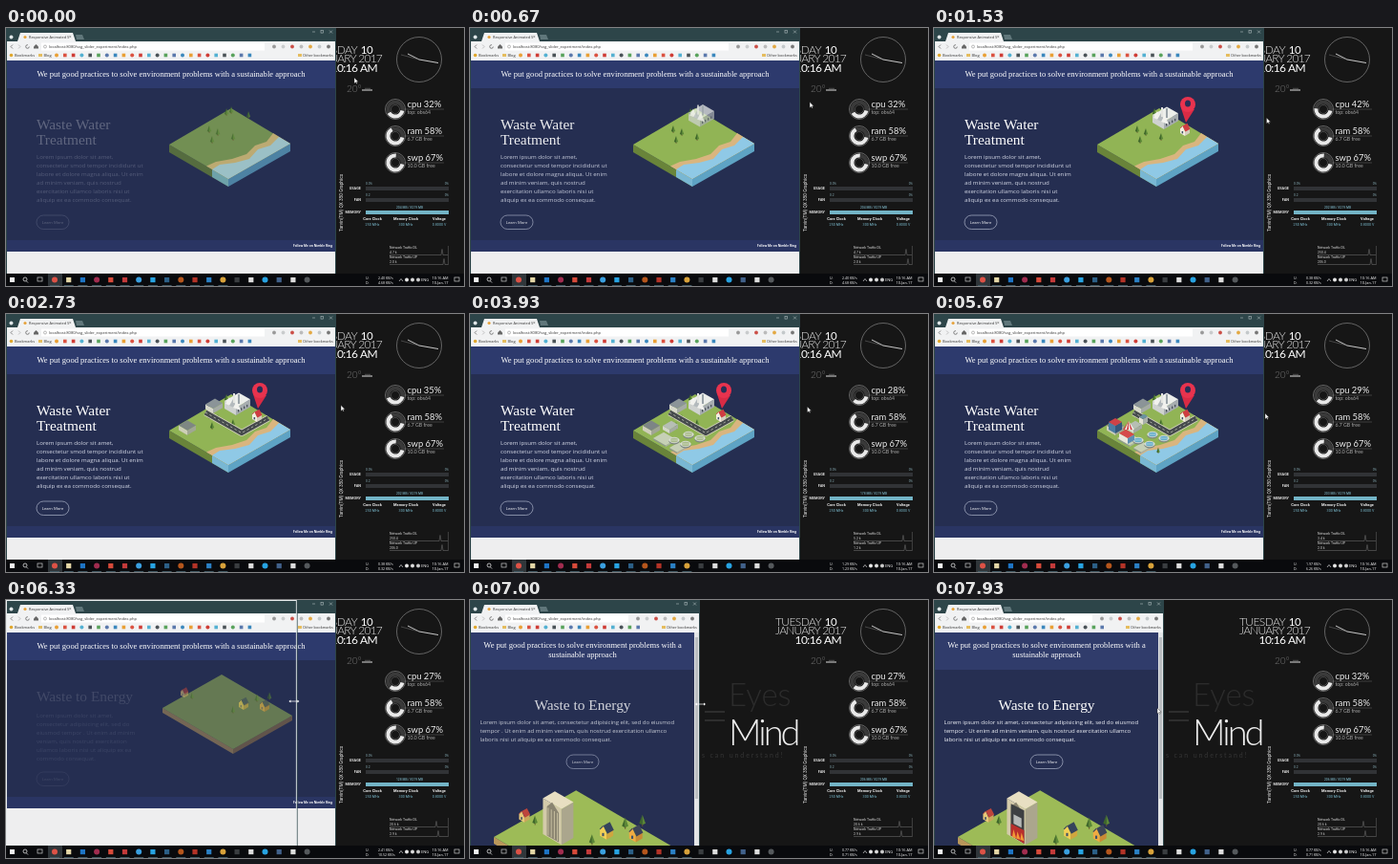
An HTML page with a canvas for the animation above (8 s loop, 480 by 270 pixels).

```html
<!DOCTYPE html>
<html lang="en">
<head>
<meta charset="utf-8">
<title>Responsive slider on a desktop</title>
<style>
html, body { margin: 0; width: 100%; height: 100%; overflow: hidden; background: #161616; }
canvas { display: block; width: 480px; height: 270px; }
</style>
</head>
<body>
<canvas id="stage"></canvas>
<script>
const LOOP = 8000, FULL = 346;
const SERIF = '"Liberation Serif", serif', SANS = '"Open Sans", sans-serif';
const LATO = 'Lato, sans-serif', ROBOTO = 'Roboto, sans-serif';
const canvas = document.getElementById('stage');
const ratio = window.devicePixelRatio || 1;
canvas.width = 480 * ratio;
canvas.height = 270 * ratio;
const c = canvas.getContext('2d');

// Time helpers
const clamp = v => Math.max(0, Math.min(1, v));
const ramp = (t, from, to) => { const p = clamp((t - from) / (to - from)); return p * p * (3 - 2 * p); };
const held = (steps, t) => steps.filter(s => s[0] <= t).pop()[1];
function track(steps, t) {
  const i = steps.findIndex(s => s[0] > t);
  if (i < 0) return steps[steps.length - 1].slice(1);
  if (i === 0) return steps[0].slice(1);
  const a = steps[i - 1], b = steps[i], p = (t - a[0]) / (b[0] - a[0]);
  return a.slice(1).map((v, k) => v + (b[k + 1] - v) * p);
}

// Drawing helpers
function rect(x, y, w, h, color) { c.fillStyle = color; c.fillRect(x, y, w, h); }
function text(s, x, y, size, color = '#fff', font = SANS, align = 'left', weight = 400, spacing = 0) {
  c.font = `${weight} ${size}px ${font}`;
  c.letterSpacing = `${spacing}px`;
  c.textAlign = align;
  c.fillStyle = color;
  c.fillText(s, x, y);
}
function trace(points) {
  c.beginPath();
  for (let i = 0; i < points.length; i += 2) c.lineTo(points[i], points[i + 1]);
}
function poly(color, ...points) { trace(points); c.closePath(); c.fillStyle = color; c.fill(); }
function line(color, width, ...points) { trace(points); c.strokeStyle = color; c.lineWidth = width; c.stroke(); }
function frameBox(x, y, w, h, color, width) { c.strokeStyle = color; c.lineWidth = width; c.strokeRect(x, y, w, h); }
function oval(x, y, rx, ry, color) {
  c.beginPath(); c.ellipse(x, y, rx, ry, 0, 0, 7); c.fillStyle = color; c.fill();
}
function arc(x, y, r, from, to, color, width) {
  c.beginPath(); c.arc(x, y, r, from, to); c.strokeStyle = color; c.lineWidth = width; c.stroke();
}
function pill(x, y, w, h, color) {
  c.beginPath(); c.roundRect(x, y, w, h, h / 2); c.strokeStyle = color; c.lineWidth = .7; c.stroke();
}
function layer(alpha, dy, draw) {
  if (alpha <= 0) return;
  c.save(); c.globalAlpha *= alpha; c.translate(0, dy); draw(); c.restore();
}
const drop = (t, start, draw) => { const p = ramp(t, start, start + 260); layer(p, (p - 1) * 9, draw); };

// Isometric parts; x, y is the nearest ground corner
const SLOPE = .577;
function box(x, y, a, b, h, left, right, top) {
  const ya = y - a * SLOPE, yb = y - b * SLOPE, back = y - (a + b) * SLOPE;
  poly(left, x, y, x - b, yb, x - b, yb - h, x, y - h);
  poly(right, x, y, x + a, ya, x + a, ya - h, x, y - h);
  poly(top, x, y - h, x + a, ya - h, x + a - b, back - h, x - b, yb - h);
}
function house(x, y, s, wall, side, roof) {
  const w = 5 * s, d = w * SLOPE, h = 5 * s, peakX = x - w / 2, peakY = y - d / 2 - h - 4 * s;
  poly(wall, x, y, x - w, y - d, x - w, y - d - h, peakX, peakY, x, y - h);
  poly(side, x, y, x + w, y - d, x + w, y - d - h, x, y - h);
  poly(roof, x + .5 * s, y - h + .6 * s, peakX, peakY, peakX + w, peakY - d, x + w + .5 * s, y - d - h + .6 * s);
  line(roof, .8 * s, x - w, y - d - h, peakX, peakY);
  rect(x - 3.4 * s, y - 5 * s, 1.5 * s, 2.4 * s, '#405468');
}
function tree(x, y, s = 1) {
  rect(x - .3 * s, y - 2 * s, .7 * s, 2 * s, '#6a5030');
  poly('#3f672b', x, y - 8 * s, x - 2.2 * s, y - 2 * s, x, y - 1 * s);
  poly('#5b8737', x, y - 8 * s, x, y - 1 * s, x + 2.2 * s, y - 2 * s);
}
function tank(x, y, r, liquid) {
  oval(x, y + 1.3, r, r * .58, '#7c8580');
  oval(x, y, r, r * .58, '#d3d8cd');
  oval(x, y, r * .75, r * .43, liquid);
  line('#eef0ea', .5, x - r, y, x + r, y);
}
function pin(x, y) {
  poly('#d92b45', x - 5, y - 15, x + 9, y - 14, x, y);
  oval(x + 2, y - 19, 8, 8, '#e8334e');
  oval(x + 2, y - 20, 3, 3.6, '#272f57');
}

function factory() {
  box(241, 106, 15, 12, 8, '#cfd2d0', '#a7adb0', '#eceeeb');
  for (let i = 0; i < 3; i++) poly(i % 2 ? '#b4babd' : '#f2f2ee', 230 + i * 4, 94 + i * 2, 234 + i * 4, 87 + i * 2, 238 + i * 4, 97 + i * 2);
  for (let i = 0; i < 2; i++) rect(238 + i * 5, 83 + i, 2, 10, i ? '#9aa3a8' : '#e5e6e1');
  for (let i = 0; i < 4; i++) rect(243 + i * 3, 100 - i * 1.7, 1.3, 2.5, '#4a525b');
}
function roads() {
  const path = [209, 103, 247, 124.5, 275, 109];
  c.lineJoin = 'round';
  line('#d2d1bd', 7, ...path);
  line('#454a4c', 5.4, ...path);
  c.setLineDash([2.5, 2.5]);
  line('#e9e9dc', .6, ...path);
  c.setLineDash([]);
}
function tent(x, y) {
  for (let i = 0; i < 6; i++) poly(i % 2 ? '#f3f0ea' : '#d63b44', x - 6 + i * 2, y, x, y - 9, x - 4 + i * 2, y);
}

function waterTile(t) {
  poly('#69843a', 171, 122, 233, 158, 233, 166, 171, 130);
  poly('#5ea3c4', 233, 158, 298, 121, 298, 129, 233, 166);
  poly('#79b7d3', 216, 148, 233, 158, 233, 166, 216, 156);
  poly('#91b455', 171, 122, 236, 84, 298, 121, 233, 158);
  poly('#d9b57f', 298, 121, 280, 110, 273, 119, 261, 123, 252, 132, 237, 137, 220, 140, 210, 144.5, 233, 158);
  poly('#8fc9e6', 298, 121, 286, 114, 277, 123, 264, 127, 255, 137, 240, 141, 224, 143, 216, 148, 233, 158);
  tree(231, 92);
  layer(1 - ramp(t, 350, 600), 0, () => { tree(254, 95); tree(236, 90); });
  [[222, 113], [213, 110], [238, 118], [216, 121]].forEach(p => tree(...p));
  drop(t, 1850, roads);
  drop(t, 500, factory);
  drop(t, 850, () => house(263, 113, 1, '#f3eee0', '#d3cdbd', '#cf3d42'));
  drop(t, 2200, () => box(217, 104, 10, 8, 5, '#d7d8cb', '#a5aba6', '#8b9498'));
  drop(t, 2500, () => box(190, 127, 9, 9, 5, '#cfcfbb', '#a1a695', '#7d8585'));
  drop(t, 2750, () => box(205, 139, 11, 13, 1.5, '#8e988f', '#a6afa5', '#c6d0b6'));
  drop(t, 3000, () => {
    box(217, 146, 10, 8, 1.5, '#8e988f', '#a6afa5', '#c6d0b6');
    box(209, 125, 9, 7, 4, '#d4d7ca', '#a4aba1', '#b6beb4');
  });
  const clean = ramp(t, 4350, 4700) > .5 ? '#65adcb' : '#a9ba8b';
  [[229, 126], [241, 130], [226, 136], [214, 132]].forEach((p, i) =>
    drop(t, 3150 + i * 130, () => tank(...p, 5.5, clean)));
  drop(t, 4100, () => box(190, 125, 7, 7, 8, '#4c7ca2', '#35577c', '#cd4247'));
  drop(t, 4550, () => tent(204, 121));
  drop(t, 4850, () => box(203, 136, 7, 9, 6, '#e9e7dc', '#5d8eb1', '#d54a4b'));
  drop(t, 5150, () => { box(219, 116, 5, 4, 6, '#e4e2d4', '#a9b0aa', '#6b929f'); tree(235, 146, .8); });
  drop(t, 1050, () => pin(264, 99));
}

function energyTile(t) {
  poly('#b9975a', 164, 113, 238, 156, 238, 161, 164, 118);
  poly('#967648', 238, 156, 300, 121, 300, 126, 238, 161);
  poly('#9dbb57', 164, 113, 226, 78, 300, 121, 238, 156);
  house(187, 102, .8, '#e8c878', '#c9a75c', '#bd453c');
  tree(195, 104, .9);
  tree(263, 107, 1.1);
  tree(276, 105, 1.1);
  drop(t, 6550, () => {
    box(215, 119, 9, 14, 27, '#d3caaa', '#aba68d', '#e8dfc2');
    poly('#8b8571', 204, 112, 204, 90, 208, 87, 213, 95, 213, 117);
    for (let i = 0; i < 4; i++) line('#c9c1a2', .7, 205 + i * 2.3, 112 + i * 1.3, 205 + i * 2.3, 91 + i * 1.3);
  });
  layer(ramp(t, 7150, 7500), 0, () => {
    poly('#3d4042', 204, 112, 204, 88, 214, 93, 214, 118);
    poly('#b5b9b7', 206, 96, 212, 99, 212, 106, 206, 103);
    poly('#b92f2c', 204, 112, 204, 103, 214, 108, 214, 118);
    for (let i = 0; i < 3; i++) poly('#f39b37', 205 + i * 3, 113 + i, 206 + i * 3, 107 + i + Math.sin(t / 90 + i), 208 + i * 3, 114 + i);
  });
  house(249, 115, 1, '#f3cf55', '#cfa63f', '#35435c');
  house(271, 117, 1, '#f0ab42', '#c98a35', '#3d4458');
  tree(238, 119, 1);
}

// Desktop and its gauges
function gauge(y, name, value, note) {
  arc(408, y, 10.5, 0, 7, '#8a8a8a', .7);
  arc(408, y, 7.6, 0, 7, '#3a3a3a', 4);
  arc(408, y, 7.6, .2, .2 + value / 100 * 6.28 + .4, '#e9e9e9', 4);
  arc(408, y, 4.5, 0, 7, '#777', .5);
  text(`${name} ${value}%`, 420.5, y - 2, 9.4, '#eee', LATO);
  line('#666', .5, 417, y, 459, y);
  text(note, 420.5, y + 5, 5.2, '#aaa', LATO);
}
function meter(y, label, left, fill) {
  text(label, 372, y + 2.6, 3.9, '#ddd', ROBOTO, 'right', 700);
  rect(377, y, 87, 4, fill);
  if (left) { text(left, 377, y - 1.8, 3.3, '#86aab4', ROBOTO); text('0%', 464, y - 1.8, 3.3, '#86aab4', ROBOTO, 'right'); }
}
function traffic(y, label, value, phase, t) {
  text(label, 402, y, 3.5, '#ddd', ROBOTO);
  text(value, 402, y + 4.5, 3.5, '#ccc', ROBOTO);
  const points = [];
  for (let x = 402; x <= 463; x++) {
    const spike = (x + Math.floor(t / 1000) + phase) % 31 === 0;
    points.push(x, y + 6.5 - (spike && x > 430 ? 6 : 0));
  }
  line('#777', .5, ...points);
  line('#666', .5, 463.5, y - 3, 463.5, y + 7);
}
function desktop(t) {
  rect(0, 0, 480, 270, '#161616');
  text('TUESDAY', 320, 26.5, 12, '#e5e5e5', LATO, 'left', 300, -.6);
  text('10', 384, 26.5, 11.5, '#fff', LATO, 'right', 400, -.6);
  text('JANUARY 2017', 394, 36, 12, '#e5e5e5', LATO, 'right', 300, -.8);
  text('10:16 AM', 389, 46, 12, '#fff', LATO, 'right', 400, -.6);
  text('20°', 357, 66.5, 10, '#777', LATO, 'left', 300);
  line('#ddd', 1, 373, 65, 384, 65);
  line('#777', .6, 376, 63.3, 382, 63.3);
  arc(433, 33, 23.5, 0, 7, '#777', .8);
  line('#ddd', .9, 421, 27, 433, 33, 453, 36.5);
  line('#777', .5, 414, 28, 433, 33);

  text('Eyes', 271, 111, 33, '#2c2c2c', LATO, 'left', 300);
  text('Mind', 271, 152, 38, '#eee', LATO, 'left', 300, -3);
  rect(246, 116, 21, 2, '#2e2e2e');
  rect(246, 125, 21, 2, '#2e2e2e');
  text('s can understand!', 243, 165, 7, '#353535', LATO, 'left', 400, 1.9);

  gauge(85, 'cpu', held([[0, 32], [930, 42], [1930, 35], [2930, 28], [4930, 29], [5930, 27], [7400, 32]], t), 'top: obs64');
  gauge(113, 'ram', 58, '6.7 GB free');
  gauge(141, 'swp', 67, '10.0 GB free');

  c.save();
  c.translate(353, 183); c.rotate(-Math.PI / 2);
  text('Tarvin(TM) QX 350 Graphics', 0, 0, 4.8, '#eee', ROBOTO, 'center');
  c.restore();
  meter(166, 'USAGE', '0.0%', '#313336');
  meter(178, 'FAN', '0.2', '#313336');
  meter(191, 'MEMORY', '', '#73b4c6');
  const memory = held([[0, 204], [930, 202], [2930, 178], [4930, 203], [5930, 128], [6930, 206]], t);
  text(`${memory} MB / 8219 MB`, 423, 189, 3.4, '#86c3d5', ROBOTO, 'center');
  [['Core Clock', '250 MHz', 384], ['Memory Clock', '300 MHz', 419], ['Voltage', '0.8000 V', 454]].forEach(([name, value, x]) => {
    text(name, x, 201, 4, '#eee', ROBOTO, 'center', 700);
    text(value, x, 206.5, 3.7, '#78b7ca', ROBOTO, 'center');
  });
  traffic(231, 'Network Traffic DL', held([[0, '4.7 k'], [930, '250.4'], [2930, '5.2 k'], [4930, '3.4 k'], [5930, '20.6 k']], t), 8, t);
  traffic(241, 'Network Traffic UP', held([[0, '2.0 k'], [930, '206.0'], [2930, '1.2 k'], [4930, '2.0 k'], [5930, '2.9 k']], t), 6, t);
}

function taskbar(t) {
  rect(0, 257, 480, 13, '#090a0d');
  rect(44, 257, 15, 13, '#30363a');
  rect(4, 261, 5, 5, '#eee');
  arc(20, 263, 2, 0, 7, '#ddd', .8);
  line('#ddd', .8, 21.5, 265, 23, 266.5);
  frameBox(33, 261, 5, 4, '#ccc', .7);
  const icons = ['#dd5246', '#e3d6a6', '#1d74c4', '#a02c4f', '#d64a3a', '#c33a3a', '#3aa0e0', '#27a3e2', '#2c5f86', '#b5561c',
    '#b33327', '#2b80c4', '#d8a23a', '#3a3d40', '#dddddd', '#27a3e2', '#41618a', '#dddddd', '#55595c'];
  icons.forEach((color, i) => {
    const x = 51 + i * 14.7;
    if (i % 3 === 0) oval(x, 263.5, 3, 3, color); else rect(x - 2.6, 261, 5.2, 5.2, color);
    if (i < 13) rect(x - 5, 269, 10, 1, '#3f5660');
  });
  text('U:', 377, 263, 3.5); text('D:', 377, 268, 3.5);
  text(held([[0, '2.40 KB/s'], [930, '0.38 KB/s'], [2930, '1.29 KB/s'], [4930, '1.97 KB/s'], [5930, '2.41 KB/s'], [6930, '0.77 KB/s']], t), 390, 263, 3.6);
  text(held([[0, '4.68 KB/s'], [930, '0.32 KB/s'], [2930, '1.23 KB/s'], [4930, '6.26 KB/s'], [5930, '10.52 KB/s'], [6930, '0.71 KB/s']], t), 390, 268, 3.6);
  line('#ddd', .7, 412, 265, 414, 262.5, 416, 265);
  ['#e8e8e8', '#ddd', '#ccc'].forEach((color, i) => oval(420 + i * 6, 263.5, 2, 2, color));
  text('ENG', 435, 265, 4);
  text('10:16 AM', 455, 263, 3.9, '#fff', SANS, 'center');
  text('10-Jan-17', 455, 268, 3.9, '#fff', SANS, 'center');
  frameBox(470, 261, 5, 4, '#ccc', .7);
}

// Browser
function controls(right) {
  const color = '#aebbbd';
  line(color, .6, right - 25, 4, right - 22, 4);
  frameBox(right - 16, 2.5, 2.6, 2.6, color, .6);
  line(color, .6, right - 7, 2.5, right - 4, 5.5);
  line(color, .6, right - 4, 2.5, right - 7, 5.5);
}
function chrome(w) {
  rect(0, 0, w, 257, '#2d4549');
  oval(5.5, 9.5, 2, 2, '#dfe6e8');
  poly('#f1f2f3', 12, 14, 15, 5, 70, 5, 73, 14);
  poly('#60777b', 74, 12, 73, 7, 80, 7, 82, 12);
  oval(20, 9.5, 1.6, 1.6, '#e6a33d');
  text('Responsive Animated S', 24, 11, 3.9, '#333');
  text('×', 66, 11, 4.5, '#555');
  controls(w);
  rect(1, 14, w - 2, 20, '#f1f2f3');
  line('#555', .7, 7, 17.5, 5, 19.5, 7, 21.5);
  line('#aaa', .7, 13, 17.5, 15, 19.5, 13, 21.5);
  arc(22.5, 19.5, 1.8, 0, 5, '#555', .7);
  poly('#666', 29, 19.5, 31.5, 17, 34, 19.5, 34, 21.5, 29, 21.5);
  rect(37, 15.5, w - 112, 8, '#fff');
  arc(41, 19.5, 1.5, 0, 7, '#777', .5);
  text('localhost:8080/svg_slider_experiment/index.php', 45, 21, 4.1, '#333');
  ['#999', '#c9cccd', '#cb4f47', '#bbb', '#e3a944', '#c4c9cb', '#777'].forEach((color, i) => oval(w - 65 + i * 9.5, 19.5, 1.9, 1.9, color));
  oval(5.5, 28.5, 1.8, 1.8, '#e0a72c');
  text('Bookmarks', 9, 30, 4, '#333');
  rect(34, 27, 4, 3, '#e5bd5f'); text('Blog', 39.5, 30, 4, '#333');
  const hues = ['#e9a035', '#59a35c', '#cf3d36', '#3b88bd', '#4b5358', '#db5241', '#5b79ac', '#54b1d2'];
  for (let i = 0; i < (w > 300 ? 24 : 15); i++) {
    const x = 53 + i * 8.8;
    if (i % 3) rect(x - 1.8, 26.7, 3.6, 3.6, hues[i * 5 % 8]); else oval(x, 28.5, 2, 2, hues[i * 5 % 8]);
  }
  rect(w - 40, 27, 4, 3, '#e5bd5f');
  text('Other bookmarks', w - 35, 30, 3.9, '#333');
}
function paragraph(lines, x, y, size, step, color) { lines.forEach((s, i) => text(s, x, y + i * step, size, color)); }
function button(x, y) {
  pill(x, y, 34, 14.5, '#aeb5ca');
  text('Learn More', x + 17, y + 8.8, 4.2, '#fff', SANS, 'center');
}
function footer(y) {
  rect(1, y, 344, 12, '#2a3563');
  text('Follow Me on Nimble Ring', 342, y + 6.5, 3.2, '#fff', SANS, 'right', 700);
}
function widePage(t) {
  const second = t >= 6130;
  rect(1, 34, 344, 223, '#eeeeef');
  rect(1, 34, 344, 29, '#2d3a6d');
  text('We put good practices to solve environment problems with a sustainable approach', 173, 50.5, 8.55, '#fff', SERIF, 'center');
  rect(1, 63, 344, second ? 143 : 159, '#252e51');
  footer(second ? 206 : 222);
  if (second) {
    layer(.06 + .5 * ramp(t, 6150, 6900), 0, () => {
      text('Waste to Energy', 32, 106, 15.4, '#fff', SERIF);
      paragraph(['Lorem ipsum dolor sit amet,', 'consectetur adipisicing elit, sed do', 'eiusmod tempor . Ut enim ad minim', 'veniam, quis nostrud exercitation', 'ullamco laboris nisi ut aliquip ex ea', 'commodo consequat.'], 32, 123, 6.1, 8.9, '#dce0ed');
      button(32, 180);
    });
    layer(.35 + .65 * ramp(t, 6130, 6700), 0, () => energyTile(t));
  } else {
    layer(.27 + .73 * ramp(t, 0, 850), 0, () => {
      text('Waste Water', 32, 106, 15.4, '#fff', SERIF);
      text('Treatment', 32, 121.5, 15.4, '#fff', SERIF);
      paragraph(['Lorem ipsum dolor sit amet,', 'consectetur smod tempor incididunt ut', 'labore et dolore magna aliqua. Ut enim', 'ad minim veniam, quis nostrud', 'exercitation ullamco laboris nisi ut', 'aliquip ex ea commodo consequat.'], 32, 137, 6.13, 9, '#d5d9e7');
      button(32, 196);
    });
    layer(.72 + .28 * ramp(t, 0, 500), 0, () => waterTile(t));
  }
}
function narrowPage(t, w) {
  const mid = (w - 5) / 2;
  rect(1, 34, w - 2, 223, '#262f52');
  rect(1, 34, w - 2, 39, '#303c6b');
  text('We put good practices to solve environment problems with a', mid, 50, 8.55, '#fff', SERIF, 'center');
  text('sustainable approach', mid, 59.5, 8.55, '#fff', SERIF, 'center');
  layer(.2 + .8 * ramp(t, 6300, 7350), 0, () => {
    text('Waste to Energy', mid, 114.5, 15.4, '#fff', SERIF, 'center');
    paragraph(['Lorem ipsum dolor sit amet, consectetur adipisicing elit, sed do eiusmod', 'tempor . Ut enim ad minim veniam, quis nostrud exercitation ullamco', 'laboris nisi ut aliquip ex ea commodo consequat.'], 10.5, 130, 6.05, 9, '#f0f2f8');
    button(mid - 17, 162);
  });
  c.save();
  c.beginPath(); c.rect(1, 73, w - 7, 184); c.clip();
  c.translate(mid - 93, 248); c.scale(1.39, 1.39); c.translate(-164, -113);
  energyTile(t);
  c.restore();
  rect(w - 6, 34, 5, 223, '#e3e5e7');
  rect(w - 5, 39, 3, 169, '#b9bdc0');
}

function cursor(t) {
  const [x, y] = track([[0, 365, 52], [500, 360, 68], [930, 350, 92], [1530, 348.5, 94], [3930, 353.5, 97], [5670, 347, 104],
    [6070, 345, 106], [6330, 302, 106], [6850, 241.5, 109], [7350, 241.5, 109], [7930, 234, 113]], t);
  if (t > 6000 && t < 7400) {
    line('#fff', .7, x - 4, y, x + 4, y);
    poly('#fff', x - 5.5, y, x - 3.5, y - 1.6, x - 3.5, y + 1.6);
    poly('#fff', x + 5.5, y, x + 3.5, y - 1.6, x + 3.5, y + 1.6);
  } else {
    const shape = [x, y, x, y + 6, x + 1.5, y + 4.8, x + 2.5, y + 6.5, x + 3.3, y + 6, x + 2.4, y + 4.3, x + 4.2, y + 4.2, x, y];
    poly('#fff', ...shape);
    line('#222', .4, ...shape);
  }
}

function draw(t) {
  c.setTransform(ratio, 0, 0, ratio, 0, 0);
  desktop(t);
  const [edge] = track([[6070, FULL], [6330, 305], [6850, 241]], t);
  if (t < 6600) {
    chrome(FULL);
    widePage(t);
    if (t > 6100) {
      frameBox(.5, .5, edge - 1, 256, '#e8eced', 1);
      rect(edge, 0, .7, 257, '#2d4549');
    }
  } else {
    chrome(edge);
    narrowPage(t, edge);
  }
  taskbar(t);
  cursor(t);
}

const start = performance.now();
function frame(now) {
  draw(Math.max(0, now - start) % LOOP);
  requestAnimationFrame(frame);
}
draw(0);
requestAnimationFrame(frame);
</script>
</body>
</html>
```
